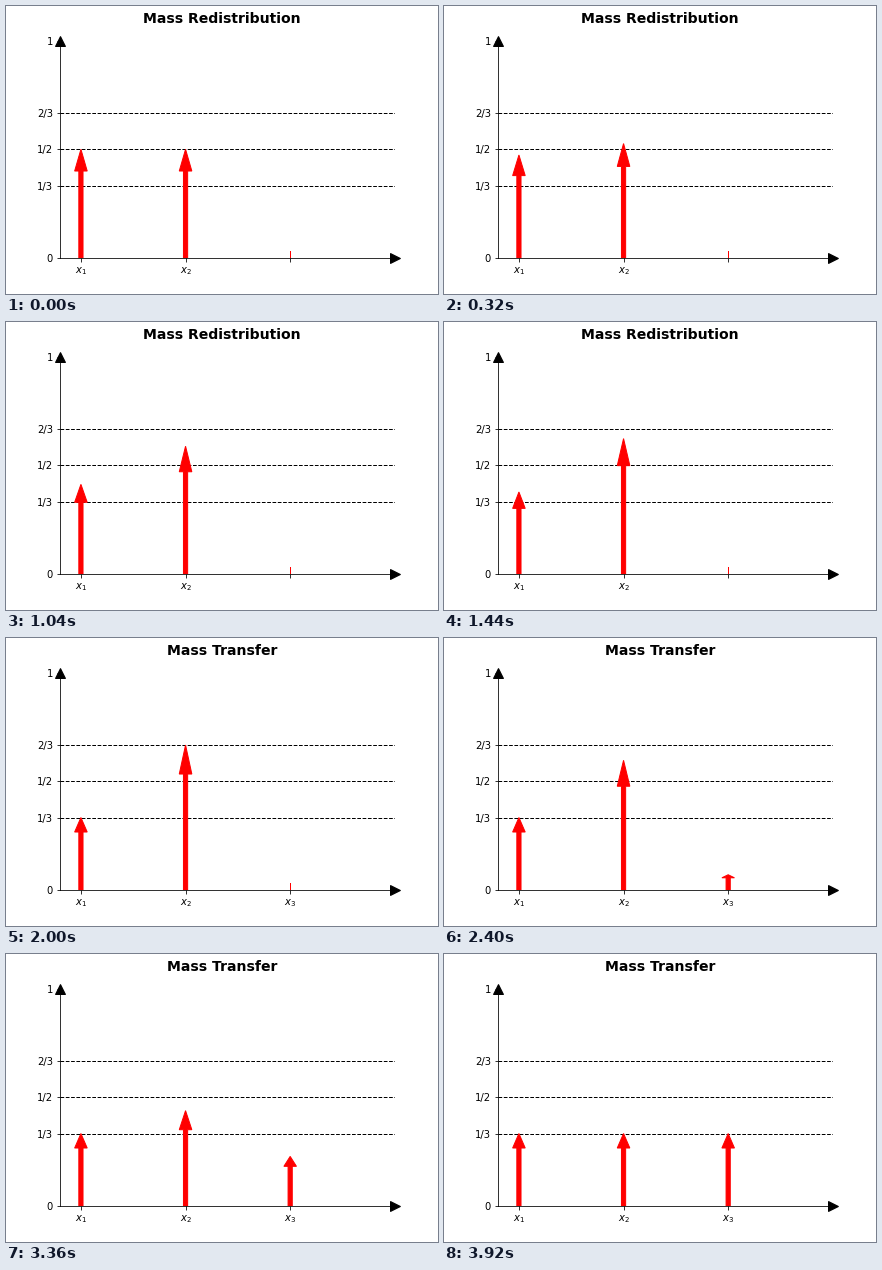
Animation, 432 px wide and 288 px high, one loop 4 s. Source, as a matplotlib script:

```python
import matplotlib.pyplot as plt
from matplotlib.animation import FuncAnimation

FRAMES, INTERVAL = 50, 80
STEP_MS = 100          # the pose changes every 100 ms
PHASE = 20             # poses in each half
XS = (0.1, 0.6, 1.1)
WIDTH = 0.02

plt.rcParams["font.family"] = "DejaVu Sans"
fig = plt.figure(figsize=(6, 4), dpi=72, facecolor="white")
ax = fig.add_axes([0.125, 0.125, 0.775, 0.755])
ax.set_xlim(0, 1.6)
ax.set_ylim(0, 1)
ax.spines[["top", "right"]].set_visible(False)
ax.set_yticks([0, 1 / 3, 1 / 2, 2 / 3, 1], ["0", "1/3", "1/2", "2/3", "1"])
ax.set_xticks(XS, ["$x_1$", "$x_2$", ""])
title = fig.suptitle("", fontsize=14, fontweight="bold")

for level in (1 / 3, 1 / 2, 2 / 3):
    ax.axhline(level, color="black", linestyle="--", linewidth=1, zorder=0.9)
for x, y, marker in ((1, 0, ">"), (0, 1, "^")):
    ax.plot(x, y, marker, color="black", markersize=10,
            transform=ax.transAxes, clip_on=False)

arrows = [ax.arrow(x, 0, 0, 0.5, width=WIDTH, head_width=3 * WIDTH,
                   head_length=0.1, length_includes_head=True,
                   color="red", linewidth=1) for x in XS]
# An empty mass shows as a thin upright stroke.
stub, = ax.plot([XS[2]] * 2, [0, 1.5 * WIDTH], color="red", linewidth=1)


def masses(pose):
    share = pose % PHASE / (PHASE - 1)
    if pose < PHASE:
        return 1 / 2 - share / 6, 1 / 2 + share / 6, 0
    return 1 / 3, 2 / 3 - share / 3, share / 3


def draw(frame):
    pose = frame * INTERVAL // STEP_MS
    moved = pose >= PHASE
    title.set_text("Mass Transfer" if moved else "Mass Redistribution")
    ax.set_xticklabels(["$x_1$", "$x_2$", "$x_3$" if moved else ""])
    heights = masses(pose)
    for arrow, height in zip(arrows, heights):
        arrow.set_visible(height > 0)
        if height > 0:
            arrow.set_data(dy=height, head_length=height / 5)
    stub.set_visible(heights[2] == 0)
    return [title, stub, *arrows]


anim = FuncAnimation(fig, draw, frames=FRAMES, interval=INTERVAL,
                     repeat=True, repeat_delay=0, blit=False)
plt.show()
```
